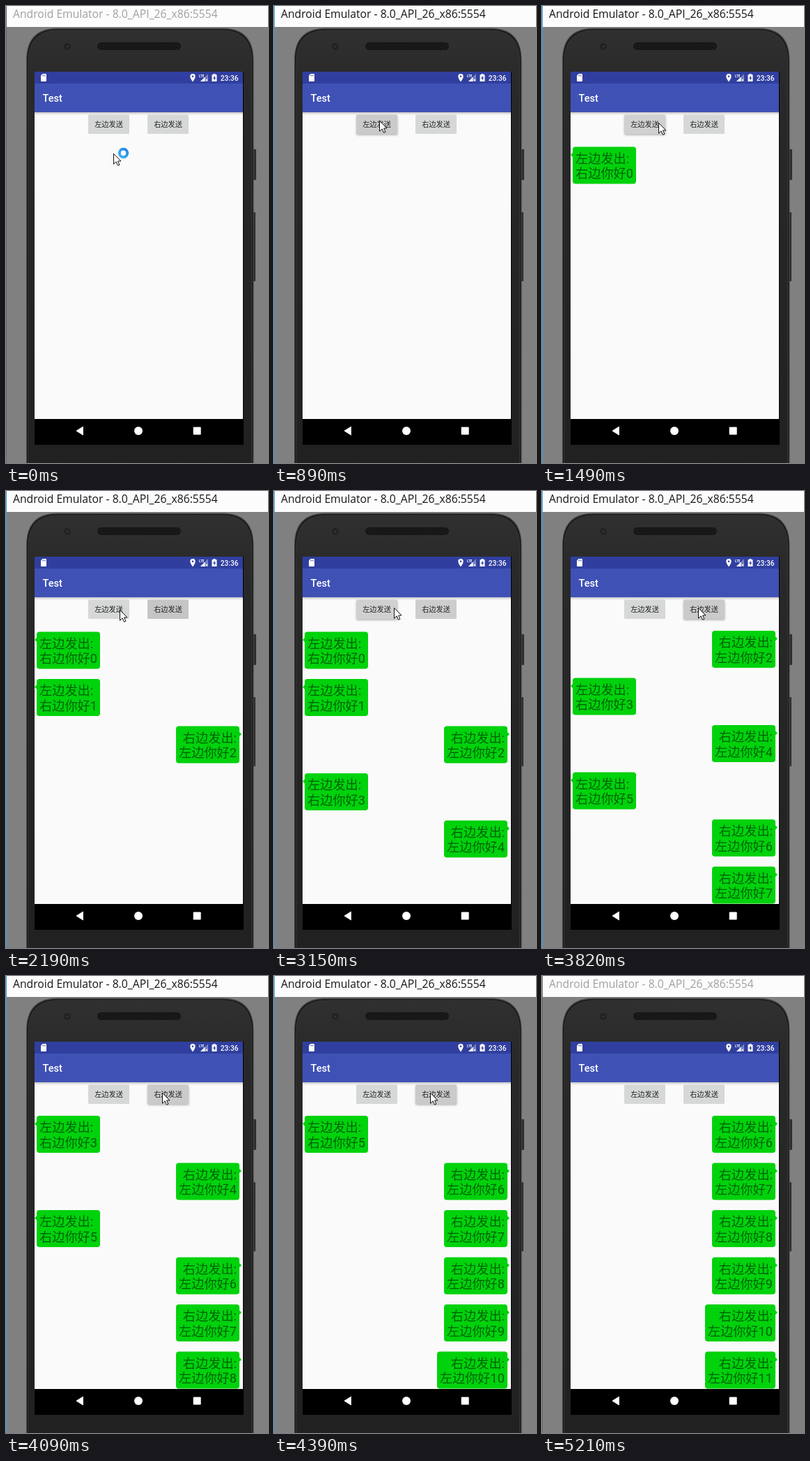
Recreate the animation shown at these times as an HTML page. Size 376 by 654 pixels, loop 5.25 s.

```html
<!DOCTYPE html>
<html lang="zh-CN">
<head>
<meta charset="utf-8">
<title>Chat bubbles</title>
<style>
  html, body { margin: 0; width: 100%; height: 100%; overflow: hidden; background: #808080; }
  svg { display: block; width: 100vw; height: 100vh; }
  text { font-family: Roboto, "Noto Sans CJK SC", "Noto Sans CJK", sans-serif; }
  #title { font: 15.7px "Open Sans", "Noto Sans", sans-serif; }
  .label { font-size: 10.2px; fill: #222; }
  .msg { font-size: 18.2px; fill: #006105; }
</style>
</head>
<body>
<svg viewBox="0 0 376 654" preserveAspectRatio="none">
  <defs>
    <linearGradient id="body" x1="0" y1="0" x2="0" y2="1">
      <stop offset="0" stop-color="#303030"/>
      <stop offset=".12" stop-color="#292929"/>
      <stop offset="1" stop-color="#212121"/>
    </linearGradient>
    <linearGradient id="drop" x1="0" y1="0" x2="0" y2="1">
      <stop offset="0" stop-color="#000" stop-opacity=".22"/>
      <stop offset="1" stop-color="#000" stop-opacity="0"/>
    </linearGradient>
    <linearGradient id="ring" x1="0" y1="1" x2="1" y2="0">
      <stop offset="0" stop-color="#45b4f4"/>
      <stop offset="1" stop-color="#2386e0"/>
    </linearGradient>
    <pattern id="grille" width="4" height="4" patternUnits="userSpaceOnUse">
      <rect width="4" height="4" fill="#111"/>
      <circle cx="1" cy="1" r=".8" fill="#303030"/>
      <circle cx="3" cy="3" r=".8" fill="#303030"/>
    </pattern>
    <clipPath id="list"><rect x="41" y="152" width="299" height="439"/></clipPath>
    <filter id="soft" x="-20%" y="-30%" width="140%" height="170%"><feGaussianBlur stdDeviation="1.5"/></filter>
  </defs>

  <!-- emulator window -->
  <rect width="376" height="654" fill="#808080"/>
  <rect width="376" height="30" fill="#fcfcfc"/>
  <rect id="edge" width="1" height="654"/>
  <text id="title" x="10" y="17">Android Emulator - 8.0_API_26_x86:5554</text>

  <!-- phone -->
  <rect x="354" y="205" width="5" height="44" rx="1" fill="#303030"/>
  <rect x="354" y="295" width="4" height="99" rx="1" fill="#303030"/>
  <path d="M29 660V78Q29 31.500 74 31.500H311Q355.500 31.500 355.500 78V660Z" fill="#4a4a4a"/>
  <path d="M30 660V78Q30 33 74 33H311Q354.500 33 354.500 78V660Z" fill="#1b1b1b"/>
  <path d="M32 660V79Q32 35 75 35H310Q352.500 35 352.500 79V660Z" fill="url(#body)" stroke="#363636"/>
  <circle cx="88" cy="58" r="5" fill="#222"/>
  <circle cx="88" cy="58" r="1.600" fill="#35383c"/>
  <rect x="131.500" y="52.500" width="119" height="10" rx="5" fill="url(#grille)" stroke="#151515"/>

  <!-- screen -->
  <rect x="41" y="94" width="300" height="534" fill="#000"/>
  <rect x="41" y="94" width="299" height="17" fill="#303f9f"/>
  <rect x="41" y="111" width="299" height="41" fill="#3f51b5"/>
  <rect x="41" y="152" width="299" height="439" fill="#fafafa"/>
  <rect x="41" y="152" width="299" height="4" fill="url(#drop)"/>
  <text x="52.600" y="137" font-size="14.500" font-weight="500" fill="#fff">Test</text>

  <g fill="#fff">
    <path d="M52.500 97H57Q58 97 58 98V107Q58 108 57 108H51Q50 108 50 107V99.500Z"/>
    <path d="M52.700 98.500v2m1.800-2v2m1.800-2v2" stroke="#303f9f" stroke-width=".8"/>
    <path d="M268 108.500Q264.300 103.500 264.300 100.800A3.700 3.700 0 0 1 271.700 100.800Q271.700 103.500 268 108.500Z"/>
    <circle cx="268" cy="100.800" r="1.300" fill="#303f9f"/>
    <text x="277" y="101.500" font-size="4.500" font-weight="700">LTE</text>
    <path d="M279 108L290 97V108Z" opacity=".35"/>
    <path d="M279 108L285.500 101.500V108Z"/>
    <path d="M286.500 104.500l3 3m0-3l-3 3" stroke="#fff" stroke-width=".9"/>
    <path d="M297.500 97H300.500V98.200H302.500V108H295.500V98.200H297.500Z"/>
    <path d="M299.700 99.500L297 103.800H298.700V106.800L301.200 102.500H299.700Z" fill="#303f9f"/>
    <text x="307.700" y="106.500" font-size="10.200" font-weight="500">23:36</text>
    <path d="M101 608L110.500 602V614Z" stroke="#fff" stroke-width=".8" stroke-linejoin="round"/>
    <circle cx="190" cy="608" r="6"/>
    <rect x="268.700" y="602.500" width="11" height="11" rx="1"/>
  </g>

  <g id="buttons"></g>
  <g clip-path="url(#list)"><g id="rows"></g></g>

  <g id="cursor">
    <circle id="busy" cx="14.500" cy=".5" r="5.700" fill="#fff" stroke="url(#ring)" stroke-width="4"/>
    <path d="M.5 1.300V16.300L4.100 12.900L6.500 18.300L8.900 17.300L6.600 12H11Z" fill="#fff" stroke="#111"/>
  </g>
</svg>
<script>
const LOOP = 5250, PITCH = 67.5, TOP = 201.5, FIT = 6;
const GREEN = '#00d20c';
const byId = id => document.getElementById(id);

// time of arrival and side of each message
const sent = [1040, 1610, 2190, 2490, 2880, 3270, 3540, 3690, 3970, 4240, 4390, 4540];
const onLeft = i => [0, 1, 3, 5].includes(i);

// time, x, y
const path = [
  [0, 154, 210], [430, 152, 204], [580, 140, 177], [740, 139, 165], [890, 151, 163],
  [1040, 152, 163], [1190, 162, 166], [1490, 167, 166], [1610, 211, 168], [1760, 248, 169],
  [2040, 244, 169], [2190, 163, 169], [2340, 160, 169], [2490, 163, 168], [2610, 223, 168],
  [2760, 226, 168], [2880, 205, 168], [3030, 168, 167], [3150, 172, 166], [3270, 168, 167],
  [3390, 205, 167], [3540, 224, 166], [4660, 230, 612], [4780, -50, -50]
];

// time, colour, raised
const IDLE = '#d6d7d7';
const leftStates = [
  [0, IDLE, 0], [890, '#cacaca', 1], [1040, IDLE, 0], [1490, '#d0d0d0', 1], [1610, IDLE, 0],
  [2490, '#d0d0d0', 1], [2610, IDLE, 0], [3150, '#d0d0d0', 1], [3390, IDLE, 0]
];
const rightStates = [
  [0, IDLE, 0], [2040, '#cacaca', 1], [2190, '#c5c5c5', 0], [2760, '#cacaca', 1],
  [2880, '#cdcdcd', 0], [3270, IDLE, 0], [3540, '#cacaca', 1], [3970, '#c5c5c5', 0],
  [4090, '#cacaca', 1], [4540, '#c5c5c5', 0], [4660, IDLE, 0]
];

const at = (steps, t) => steps.findLast(s => s[0] <= t);

function addButton(x, label) {
  const g = document.createElementNS('http://www.w3.org/2000/svg', 'g');
  g.innerHTML = `
    <rect x="${x}" y="157" width="59.500" height="28" rx="2" fill="#000" opacity=".25" filter="url(#soft)"/>
    <rect x="${x}" y="155.500" width="59" height="27.500" rx="1.500"/>
    <text class="label" x="${x + 9.2}" y="173">${label}</text>`;
  byId('buttons').append(g);
  const [shade, face] = g.children;
  return ([, colour, raised]) => {
    face.setAttribute('fill', colour);
    shade.style.display = raised ? '' : 'none';
  };
}

function bubble(i) {
  const left = onLeft(i), y = TOP + PITCH * i;
  const w = i > 9 ? 101 : 91;
  const x = left ? 44 : 335 - w;
  const tail = left ? `M45 ${y + 7.5}L41 ${y + 11.5}L45 ${y + 15.5}Z`
                    : `M334 ${y + 7.5}L338 ${y + 11.5}L334 ${y + 15.5}Z`;
  const [me, you] = left ? '左右' : '右左';
  const line = (s, dy) =>
    `<text class="msg" x="${left ? 48 : 331}" y="${y + dy}" text-anchor="${left ? 'start' : 'end'}">${s}</text>`;
  return `<g><path d="${tail}" fill="${GREEN}"/>
    <rect x="${x}" y="${y}" width="${w}" height="53" rx="4" fill="${GREEN}"/>
    ${line(me + '边发出:', 23)}${line(you + '边你好' + i, 44.5)}</g>`;
}

const setLeft = addButton(118, '左边发送');
const setRight = addButton(203, '右边发送');
const rows = byId('rows');
rows.innerHTML = sent.map((_, i) => bubble(i)).join('');

function draw(t) {
  const active = t >= 890 && t < 5210;
  byId('title').setAttribute('fill', active ? '#161616' : '#a0a0a0');
  byId('edge').setAttribute('fill', active ? '#2f9fea' : '#686868');

  setLeft(at(leftStates, t));
  setRight(at(rightStates, t));

  // the list sticks to its end; rows above the first visible one are dropped
  const count = sent.filter(s => s <= t).length;
  const first = Math.max(0, count - FIT);
  const shift = count < FIT ? 0 : -first * PITCH - 1.5;
  rows.setAttribute('transform', `translate(0 ${shift})`);
  [...rows.children].forEach((row, i) => {
    row.style.display = i >= first && i < count ? '' : 'none';
  });

  const [, x, y] = at(path, t);
  byId('cursor').setAttribute('transform', `translate(${x} ${y})`);
  byId('busy').style.display = t < 890 ? '' : 'none';
}

const start = performance.now();
function tick() {
  draw((performance.now() - start) % LOOP);
  requestAnimationFrame(tick);
}
tick();
</script>
</body>
</html>
```
